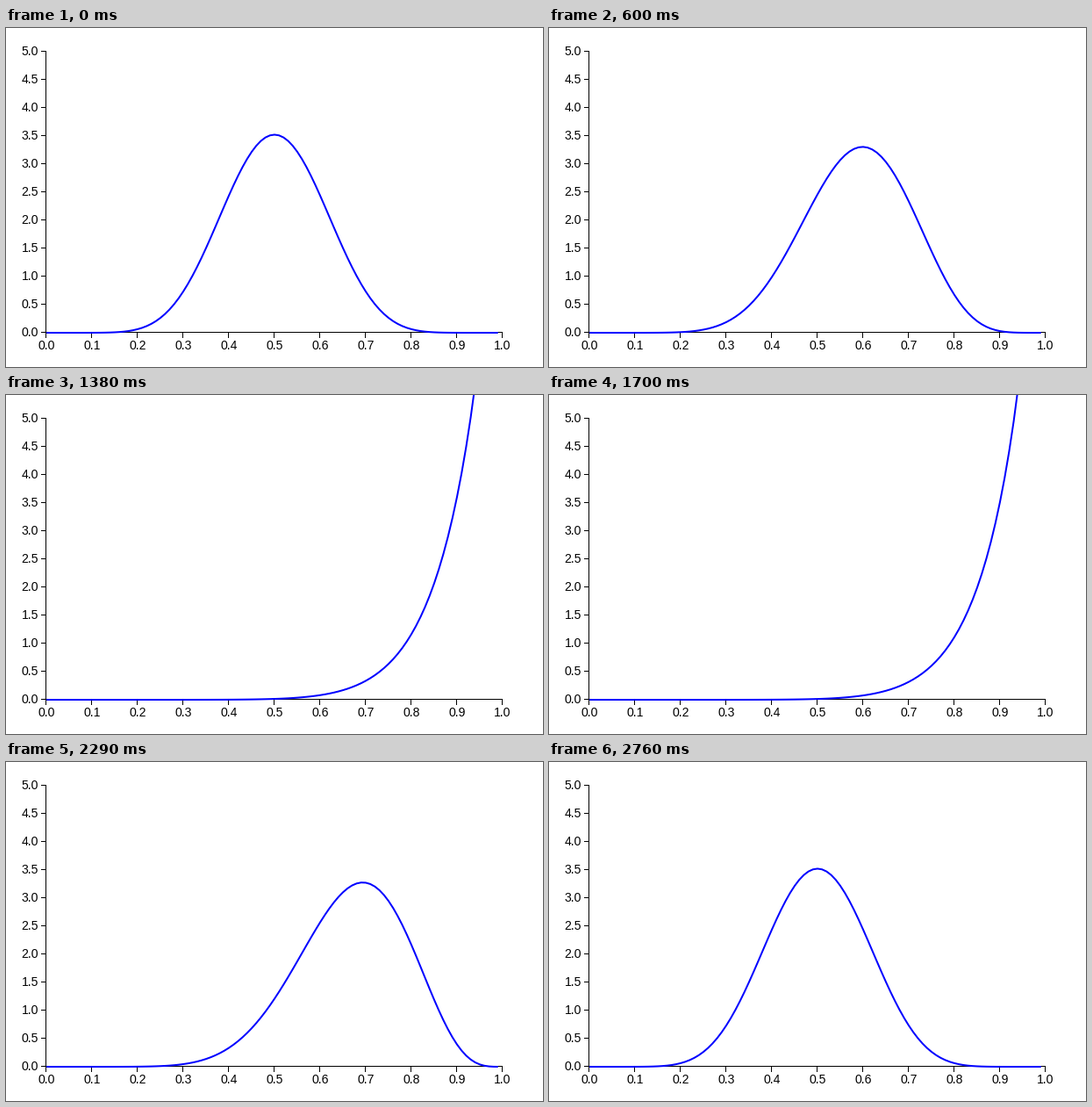
A matplotlib script for the animation above (2990 ms loop, 612 px wide and 386 px high).

```python
import math

import matplotlib.pyplot as plt
import numpy as np
from matplotlib.animation import FuncAnimation
from matplotlib.collections import PolyCollection

W, H, DPI = 612, 386, 100
LOOP, TICK = 2990, 10            # ms
X0, Y0 = 46, 347                 # plot origin in pixels
PLOT_W, PLOT_H, Y_MAX = 520, 320, 5.0
ALPHA = 10

# moments (ms) at which the curve is redrawn
STEPS = [0, 70, 140, 220, 290, 370, 440, 520,
         600, 670, 750, 830, 910, 980, 1060,
         1140, 1220, 1300, 1380, 1450, 1540, 1630,
         1700, 1780, 1850, 1930, 2000, 2080, 2160,
         2230, 2290, 2370, 2440, 2520, 2600, 2670, 2760]

# (time, beta) keys of the moving shape parameter
KEYS = np.array([(0, 10), (300, 9.2), (520, 7.5), (600, 7.03), (1060, 3.03),
                 (1380, 0.9), (1570, 0.6), (1700, 0.87), (1930, 2.03),
                 (2160, 3.5), (2290, 4.98), (2670, 9.43), (2760, 10)])
KT, KB = KEYS.T


def key_slopes():
    d = np.diff(KB) / np.diff(KT)
    inner = [2 * p * q / (p + q) if p * q > 0 else 0 for p, q in zip(d, d[1:])]
    return [0, *inner, 0]


SLOPES = key_slopes()


def beta_at(t):
    """Smooth monotone interpolation between the keys."""
    if t >= KT[-1]:
        return KB[-1]
    i = int(np.searchsorted(KT, t, side="right")) - 1
    h = KT[i + 1] - KT[i]
    u = (t - KT[i]) / h
    return ((1 + 2 * u) * (1 - u) ** 2 * KB[i] + u * (1 - u) ** 2 * h * SLOPES[i]
            + u * u * (3 - 2 * u) * KB[i + 1] + u * u * (u - 1) * h * SLOPES[i + 1])


def density(x, a, b):
    scale = math.exp(math.lgamma(a + b) - math.lgamma(a) - math.lgamma(b))
    return scale * x ** (a - 1) * (1 - x) ** (b - 1)


def rect(x, y, w, h):
    return [(x, y), (x + w, y), (x + w, y + h), (x, y + h)]


plt.rcParams["font.family"] = "Liberation Sans"
fig = plt.figure(figsize=(W / DPI, H / DPI), dpi=DPI, facecolor="white")
ax = fig.add_axes([0, 0, 1, 1])
ax.set_xlim(0, W)
ax.set_ylim(H, 0)
ax.axis("off")

bars = [rect(X0 - 1, Y0 - 1 - PLOT_H, 1, PLOT_H + 1),
        rect(X0 - 1, Y0 - 1, PLOT_W + 1, 1)]
font = dict(fontsize=14 * 72 / DPI, color="black", va="baseline")
for i in range(11):
    x = X0 + i * PLOT_W / 10
    y = Y0 - i * PLOT_H / 10
    bars.append(rect(x - 1, Y0, 1, 6))
    bars.append(rect(X0 - 6, y - 1, 6, 1))
    ax.text(x, Y0 + 19, f"{i / 10:.1f}", ha="center", **font)
    ax.text(X0 - 9, y + 4, f"{i * Y_MAX / 10:.1f}", ha="right", **font)
ax.add_collection(PolyCollection(bars, facecolors="black", edgecolors="none"),
                  autolim=False)

xs = np.arange(100) / 100
curve, = ax.plot([], [], color="blue", lw=2 * 72 / DPI, zorder=3,
                 solid_capstyle="butt", solid_joinstyle="miter")


def draw(frame):
    t = STEPS[int(np.searchsorted(STEPS, frame * TICK, side="right")) - 1]
    ys = density(xs, ALPHA, beta_at(t))
    curve.set_data(X0 + xs * PLOT_W, Y0 - ys * PLOT_H / Y_MAX)
    return curve,


anim = FuncAnimation(fig, draw, frames=LOOP // TICK, interval=TICK,
                     init_func=lambda: draw(0), blit=True, repeat=True,
                     repeat_delay=0)
plt.show()
```
